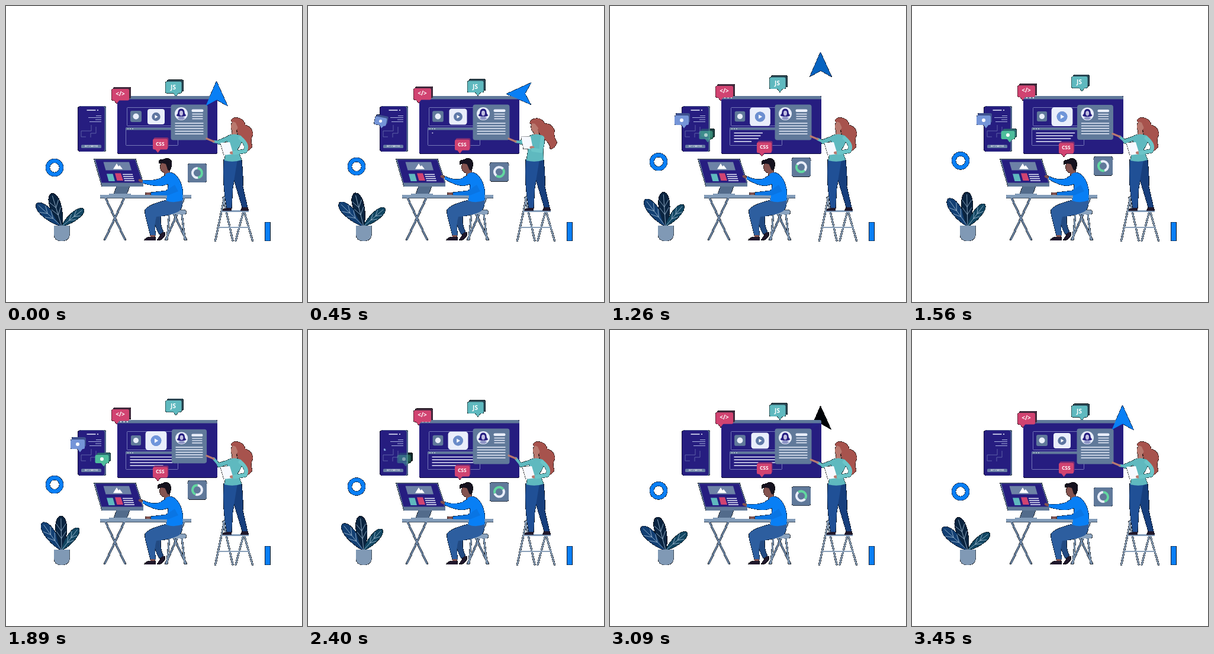
Recreate the animation shown at these times as an HTML page with a canvas. Size 500x500 px, loop 3.51 s.

```html
<!DOCTYPE html>
<html lang="en">
<head>
<meta charset="utf-8">
<title>Web design studio</title>
<style>
html, body { margin: 0; width: 100%; height: 100%; overflow: hidden; background: #fff; }
canvas { display: block; width: 500px; height: 500px; }
</style>
</head>
<body>
<canvas id="stage" width="500" height="500"></canvas>
<script>
const ctx = document.getElementById('stage').getContext('2d', { willReadFrequently: true });
const LOOP = 3510, STEP = 30;
const NAVY = '#261d80', SLATE = '#60799a', STEEL = '#829cb9', BLUE = '#087ff5',
  TEAL = '#5fb9bf', PINK = '#d14371', PALE = '#e9eefb', SKIN = '#b9796f', BROWN = '#84534f', INK = '#20182c';

const clamp = v => Math.max(0, Math.min(1, v));
const ease = (t, a, b) => { const u = clamp((t - a) / (b - a)); return u * u * (3 - 2 * u); };
const pulse = (t, a, b, c, d) => ease(t, a, b) - ease(t, c, d);

function shape(color, d) {
  ctx.fillStyle = color;
  ctx.fill(new Path2D(d));
}
function box(color, x, y, w, h, r = 0) {
  ctx.fillStyle = color;
  ctx.beginPath();
  ctx.roundRect(x, y, w, h, r);
  ctx.fill();
}
function frame(color, x, y, w, h, r) {
  ctx.strokeStyle = color;
  ctx.lineWidth = 0.8;
  ctx.beginPath();
  ctx.roundRect(x, y, w, h, r);
  ctx.stroke();
}
function oval(color, x, y, rx, ry = rx, turn = 0) {
  ctx.fillStyle = color;
  ctx.beginPath();
  ctx.ellipse(x, y, rx, ry, turn, 0, 7);
  ctx.fill();
}
function stroke(color, width, d, cap = 'round') {
  ctx.strokeStyle = color;
  ctx.lineWidth = width;
  ctx.lineCap = cap;
  ctx.lineJoin = 'round';
  ctx.stroke(new Path2D(d));
}
function text(str, x, y, size, weight = 700) {
  ctx.fillStyle = '#fff';
  ctx.font = `${weight} ${size}px "Open Sans", sans-serif`;
  ctx.textAlign = 'center';
  ctx.textBaseline = 'middle';
  ctx.fillText(str, x, y);
}
function placed(x, y, turn, scale, draw) {
  ctx.save();
  ctx.translate(x, y);
  ctx.rotate(turn);
  ctx.scale(scale, scale);
  draw();
  ctx.restore();
}
function faded(alpha, draw) {
  if (alpha <= 0) return;
  ctx.save();
  ctx.globalAlpha = alpha;
  draw();
  ctx.restore();
}
function bubble(front, back, x, y, w, h, tail, dx = 3, dy = -3) {
  box(back, x + dx, y + dy, w, h, 2.5);
  box(front, x, y, w, h, 2.5);
  shape(front, `M${tail - 5} ${y + h - 1} h10 l-5 6.5 Z`);
}

function phone(t) {
  box('#52698c', 123, 169, 46, 77, 4);
  box(NAVY, 121.5, 169.8, 45, 76, 4);
  stroke(PALE, 1.4, 'M137 176 H151');
  oval(PALE, 155, 176, 1.1);
  stroke('#a7b0dc', 1, 'M152 185.5 H161 M139 188.5 H161 M151 192 H161 M141 195.5 H161', 'butt');
  stroke('#5d60a6', 1, 'M144 201 V211 H127 V221 H135 M152 204 V215 H143 V222', 'butt');
  box('#667da4', 127, 234.5, 34, 5.5, 1.5);
  text('GET STARTED', 144, 237.4, 3.6, 600);

  const pop = pulse(t, 240, 520, 2130, 2490);
  if (pop > 0) placed(131 - 9 * pop, 204 - 11 * pop, (1 - pop) * 1.2, pop, () => {
    bubble('#7595d8', '#3e528f', -13, -8, 24, 16, 3, 2, -4);
    oval('#fff', -1, 0, 3);
  });
  faded(pulse(t, 1050, 1430, 2190, 2550), () => {
    bubble('#4dbd9b', '#2b6c70', 150.5, 211, 23, 14, 165, 3, -3.5);
    oval('#fff', 162, 218, 3);
  });
}

function profileCard(scale) {
  placed(309.5, 196.5, 0, scale, () => {
    box(SLATE, -31, -30, 62, 60, 4);
    oval(PALE, -13.5, -14.5, 11);
    shape(NAVY, 'M-22 -12 Q-19 -14 -19 -18 Q-18 -23 -13.5 -23 Q-9 -23 -8 -18 Q-8 -14 -5 -12 Q-7 -9 -13.5 -10 Q-20 -9 -22 -12 Z');
    oval('#c1bee0', -13.5, -15.5, 3, 4.2);
    shape('#8d94c5', 'M-20 -7 Q-13.5 -13 -7 -7 Q-13.5 -1.5 -20 -7 Z');
    box(PALE, 4, -22, 20, 4.5, 2);
    stroke(PALE, 1.4, 'M5 -14 H23 M5 -10 H23 M5 -6 H23', 'butt');
    stroke(PALE, 1.5, 'M-24 1.5 H24 M-24 6 H24 M-24 10.5 H24 M-24 15 H24 M-24 19.5 H24', 'butt');
  });
}

function board(t, w) {
  box(NAVY, 188, 152, 169, 97.5, 3);
  box(SLATE, 188, 152, 169, 5.5, [3, 3, 0, 0]);
  [194, 199.5, 205].forEach(x => oval('#fff', x, 155, 1.1));
  frame('#8b91c8', 204.5, 171.5, 87, 31, 1);
  frame('#8b91c8', 202.5, 205.5, 88, 30, 1);
  box(SLATE, 202.5, 205.5, 88, 4);
  [206, 210, 214].forEach(x => oval('#fff', x, 207.5, 0.8));

  placed(219.5, 186.5, 0, 1 - 0.1 * w, () => {
    box(SLATE, -9.5, -9.5, 19, 19, 3);
    oval(PALE, 0, 0, 5);
  });
  placed(253.5, 187, 0, 1 + 0.24 * w, () => {
    box(PALE, -14.5, -13, 29, 26, 4);
    oval('#5d75a0', 0, 0, 7.2);
    faded(w, () => oval('#7096dc', 0, 0, 7.2));
    shape('#fff', 'M-2 -3 L3 0 L-2 3 Z');
  });

  faded(1 - ease(t, 3120, 3420), () => {
    [72, 72, 72, 56].forEach((length, i) => {
      const grown = length * clamp((t - 420 - i * 60) / 1250);
      if (grown > 0) stroke(PALE, 1.5, `M209.5 ${214.5 + i * 4.8} h${grown}`, 'butt');
    });
  });
  profileCard(1 - 0.045 * pulse(t, 1350, 1850, 1950, 2380));
}

function labels(w) {
  const code = 140 - 6 * w, js = 127.8 - 9 * w, css = 224.6 + 7 * w;
  bubble(PINK, '#41293c', 178.5, code, 29.5, 19.5, 187);
  text('</>', 193, code + 9, 10);
  bubble(TEAL, '#294653', 269.5, js, 27, 19.5, 287);
  text('JS', 282.5, js + 10.5, 10);
  bubble(PINK, '#7c2c72', 248, css, 25, 18, 256.5, 1.5, -2.5);
  text('CSS', 260.3, css + 8.7, 8.5);
}

function arrow(t) {
  const alpha = t < 2000 ? 1 - ease(t, 1170, 1470) : ease(t, 3060, 3360);
  const lift = t < 2000 ? 57 * ease(t, 960, 1350) : 0;
  faded(alpha, () => placed(356, 148 - lift, -Math.PI / 2 * pulse(t, 60, 420, 570, 930), 1, () =>
    shape(BLUE, 'M-.5 -21 L18.5 21 L0 10.5 L-18.5 20.5 Z')));
}

function ring(w) {
  ctx.strokeStyle = BLUE;
  ctx.lineWidth = 6.6;
  ctx.beginPath();
  ctx.arc(82, 273 - 12 * w, 11.5, 0, 7);
  ctx.stroke();
}

function chart(t, w) {
  placed(323, 282 - 12 * w, 0, 1, () => {
    box(SLATE, -16, -16, 32, 32, 4);
    ctx.rotate(t / LOOP * 2 * Math.PI);
    ctx.lineCap = 'butt';
    ctx.lineWidth = 4;
    [[PALE, 1.4, 4.8], ['#62d7a0', -1.45, 1.4]].forEach(([color, from, to]) => {
      ctx.strokeStyle = color;
      ctx.beginPath();
      ctx.arc(0, 0, 8, from, to);
      ctx.stroke();
    });
  });
}

function leaf(color, degrees, length, width) {
  placed(94, 372, degrees * Math.PI / 180, 1, () => {
    const at = k => (-length * k).toFixed(1), base = width * .55;
    shape(color, `M0 0 C${-base} ${at(.2)} ${-width} ${at(.95)} 0 ${at(1)} C${width} ${at(.95)} ${base} ${at(.2)} 0 0 Z`);
    let veins = `M0 0 V${at(.92)}`;
    for (const k of [.34, .56])
      veins += `M${-width * .48} ${at(k + .2)} L0 ${at(k)} L${width * .48} ${at(k + .2)}`;
    stroke('#9db8d0', 0.8, veins);
  });
}
function plant(w) {
  leaf('#123f73', -48 + 13 * w, 57, 15);
  leaf('#0a2440', -17 + 16 * w, 58, 16);
  leaf('#114662', 52 - 15 * w, 47, 12);
  shape('#8099b5', 'M81 371 H107.5 V386 Q106 397 94 397 Q82 397 81 386 Z');
}

function desk() {
  stroke('#6e88a8', 2.6, 'M168 324 L201 394.5 M200 324 L167 394.5 M271 324 L304 394.5 M301 324 L270 394.5');
  stroke(STEEL, 2.5, 'M276 351 L272 394 M297 351 L302 394');
  box('#8aa3bf', 269, 344.5, 35.5, 7.5, 4);
  box(STEEL, 159, 319, 154, 5.5, 1);
}

function monitor() {
  shape('#526b8b', 'M187 304 H209 L204 318 H182 Z');
  box(STEEL, 174, 317, 37, 2.5, 1);
  shape(SLATE, 'M148.5 258.5 H219 L232 299 V305 H162 Z');
  shape(NAVY, 'M151 259.5 H218 L230.5 298.5 H161.5 Z');
  shape('#6d82a6', 'M164.5 263.5 H208 L212 277.5 H168.5 Z');
  shape('#fff', 'M181 275.5 L187 266 L190 271 L192 269 L197 275.5 Z');
  shape(TEAL, 'M170 283.5 H180.5 L184 296 H173.5 Z');
  shape(PINK, 'M184 282.5 H194 L198 295 H187.5 Z');
  stroke(PALE, 1.4, 'M197 284.5 H214 M198 288 H215 M199 291.5 H216 M200 295 H217', 'butt');
}

function man(t) {
  shape('#224a82', 'M249 350 L263 349 Q258 366 266 382 L259 386 Q250 371 249 350 Z');
  shape(INK, 'M255 396 L264 382 L269 383 Q269 390 261 395 Z');
  shape('#2d5e9f', 'M298 327 L271 328 Q242 335 235 344 Q234 350 237 360 L244 388 L253 388 Q250 368 254 356 Q283 353 293 346 Q299 340 298 327 Z');
  shape(BROWN, 'M244 387 H252 L251 391 H244 Z');
  shape(INK, 'M233.5 396 Q235 391.5 243 390 H252 L253 396 Z');

  shape(BROWN, 'M265 274 H276 L277 286 L268 286 Z');
  placed(272, 282, -0.1 * pulse(t, 100, 400, 3120, 3400), 1, () => {
    oval(BROWN, -5, -10, 6.5, 9);
    shape('#15121f', 'M-14 -16 Q-15 -24 -6 -23 Q2 -27 7 -21 Q10 -12 4 -4 Q1 -3 0 -9 L-2 -15 Q-9 -18 -14 -16 Z');
  });
  shape(BLUE, 'M269 284 Q276 279 283 283 Q295 290 298.5 312 V328 Q284 334 271 329 L274 303 Z');
  const hand = 295 - 6.5 * pulse(t, 100, 430, 2100, 2750);
  oval(BROWN, 227.5, hand, 4, 2.3, 0.4);
  shape(BLUE, `M283 283 Q271 283 261 291 Q248 296 231 ${hand - 1} V${hand + 4} Q254 306 266 303 Q280 300 288 291 Z`);
  oval(BROWN, 240, 317, 5, 2);
  shape('#0975e4', 'M285 302 L270 312 L245 315 V319.5 L273 320 L291 313 Z');
}

function ladder() {
  stroke('#8aa0b9', 2.4, 'M369 323 L353.5 396.5 M367 324 L383 396.5 M402 346 L416.5 396.5 M401 347 L388 396.5');
  stroke('#8aa0b9', 2, 'M359 374 H411');
  box(STEEL, 365, 345, 45, 3);
}

function woman(t) {
  const lean = pulse(t, 100, 430, 600, 950);
  const reach = pulse(t, 750, 2050, 2700, 3400);
  shape('#173f7d', 'M380 260 H398 Q401 290 400 305 L408 340 H399 L384 290 Z');
  shape('#205096', 'M368 259 H391 Q386 290 383 308 L381 342 H373 Q365 300 368 259 Z');
  shape(INK, 'M365 346 Q367 342 374 341 H381 V346 Z M396 346 L399 340 H408 L410 346 Z');

  placed(392, 216, -0.26 * lean, 1, () => {
    shape('#a7534d', 'M-12 -22 Q-9 -29 0 -27 Q10 -25 12 -15 Q24 -12 25 1 Q20 10 24 21 Q18 31 10 29 Q13 18 3 9 Q-2 -1 -2 -10 Q-8 -18 -12 -22 Z');
    oval(SKIN, -6, -13, 6, 9, 0.15);
    shape('#a7534d', 'M-12 -22 Q-6 -28 2 -23 Q6 -13 2 -6 Q-2 -14 -4 -19 Z');
  });
  shape(SKIN, 'M382 210 H389 L391 220 H381 Z');
  const waist = 391 + 6 * lean;
  shape(TEAL, `M375 219 Q385 214 397 219 Q402 228 ${waist} 242 L398 260 Q384 265 369 261 L372 241 Z`);

  const tip = 224 - 12 * reach;
  stroke(TEAL, 7, `M379 222 L360 ${230 - 2 * reach}`);
  stroke(TEAL, 4.5, `M360 ${230 - 2 * reach} L351 ${tip + 5}`);
  stroke(SKIN, 3.2, `M351 ${tip + 5} L339 ${tip}`);

  placed(372 - 3 * lean, 241 - 10 * lean, 0.09 * lean, 1, () => {
    shape('#f7f9ff', 'M-10 -10 L6 -11 L12 9 L-4 11 Z');
    oval(SKIN, 10, 7, 4, 2.4);
  });
  const elbow = 404 - 10 * lean;
  stroke('#6bc5c8', 6.5, `M396 223 Q${elbow + 6 * (1 - lean)} 235 ${elbow} 245 L${386 - 6 * lean} ${248 - 5 * lean}`);
}

// Any touched pixel becomes opaque over black, giving the dark rims and fades.
function harden() {
  const image = ctx.getImageData(0, 0, 500, 500), px = image.data;
  for (let i = 0; i < px.length; i += 4) {
    const a = px[i + 3];
    if (a === 255 || a === 0) continue;
    for (let c = 0; c < 3; c++) px[i + c] = a > 3 ? px[i + c] * a / 255 : 255;
    px[i + 3] = 255;
  }
  ctx.putImageData(image, 0, 0);
}

function render(t) {
  const w = (1 - Math.cos(t / LOOP * 2 * Math.PI)) / 2;
  ctx.clearRect(0, 0, 500, 500);
  phone(t);
  board(t, w);
  arrow(t);
  labels(w);
  ring(w);
  chart(t, w);
  plant(w);
  desk();
  monitor();
  man(t);
  ladder();
  woman(t);
  box(BLUE, 437.8, 365.5, 8.3, 31);
  harden();
}

const start = performance.now();
function tick() {
  const t = (performance.now() - start) % LOOP;
  render(Math.min(LOOP - 2 * STEP, Math.floor(t / STEP) * STEP));
  requestAnimationFrame(tick);
}
tick();
</script>
</body>
</html>
```
